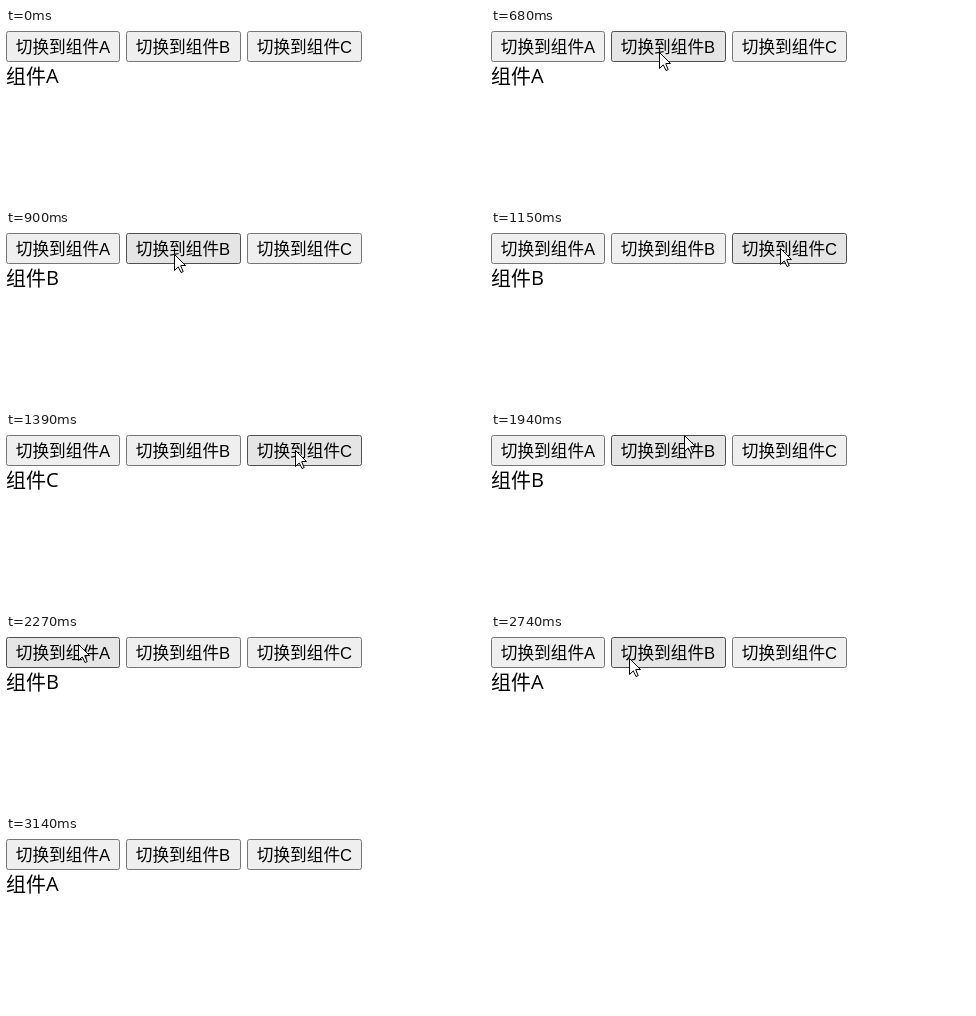
Recreate the animation shown at these times as an HTML page. Size 479x174 px, loop 3610 ms.

```html
<!DOCTYPE html>
<html lang="zh">
<head>
<meta charset="utf-8">
<title>切换组件</title>
<style>
  html, body { margin: 0; width: 100%; height: 100%; overflow: hidden; background: #fff; }
  svg { display: block; }
  .btn rect { fill: #efefef; stroke: #767676; }
  .btn.hover rect { fill: #e5e5e5; stroke: #4f4f4f; }
  .btn.down rect { fill: #f5f5f5; stroke: #8d8d8d; }
  .btn text { font: 300 16.667px "Liberation Sans", Arial, "Noto Sans CJK SC", "Noto Sans CJK", sans-serif; }
  .cjk { font: 300 20px "Noto Sans CJK SC", "Noto Sans CJK", sans-serif; }
  .latin { font: 20px "Open Sans", "Noto Sans", sans-serif; }
</style>
</head>
<body>
<svg id="stage" width="479" height="174" viewBox="0 0 479 174">
  <g id="buttons"></g>
  <text class="cjk" x="0" y="56">组件</text>
  <text class="latin" id="letter" x="40" y="55">A</text>
  <path id="cursor" d="M.5 .5V16.5L4.3 12.9L7 18.5L9.2 17.6L6.8 12V11.5H11.5Z"
        fill="#fff" stroke="#000" stroke-width="1" stroke-linejoin="round"/>
</svg>
<script>
const LOOP = 3610;
const NS = "http://www.w3.org/2000/svg";
const $ = id => document.getElementById(id);

function add(parent, tag, attrs, text) {
  const el = document.createElementNS(NS, tag);
  for (const k in attrs) el.setAttribute(k, attrs[k]);
  if (text) el.textContent = text;
  return parent.appendChild(el);
}

const buttons = [["A", 0, 114], ["B", 120, 115], ["C", 241, 115]].map(([name, x, w]) => {
  const g = add($("buttons"), "g", { class: "btn" });
  add(g, "rect", { x: x + .5, y: 3.5, width: w - 1, height: 30, rx: 2 });
  add(g, "text", { x: x + 9.8, y: 25 }, "切换到组件" + name);
  return { g, x, w };
});

// The screen refreshes in runs of seven steps.
const ticks = [0];
for (const [a, b] of [[130, 600], [680, 1150], [1310, 1790], [1880, 2350], [2590, 3060]])
  for (let i = 0; i < 7; i++) ticks.push(Math.floor((a + (b - a) * i / 6) / 10) * 10);
ticks.push(2430, 3140);
ticks.sort((a, b) => a - b);

const linear = p => p;
const easeIn = p => p * p;
const easeOut = p => 1 - (1 - p) ** 2;
const smooth = p => p * p * (3 - 2 * p);

// time, x, y, easing towards the point
const path = [
  [130, 293, 143, linear],
  [680, 168, 24, easeOut],
  [830, 168, 24, linear],
  [1150, 289, 18, smooth],
  [1390, 289, 18, linear],
  [1710, 197, 11, smooth],
  [1790, 194, 1, linear],
  [1950, 192, 4, linear],
  [2270, 72, 10, smooth],
  [2350, 70, 1, linear],
  [2430, 70, 5, linear],
  [2590, 72, 7, linear],
  [2740, 138, 24, easeIn],
  [3060, 354, 132, linear]
];
const presses = [[750, 830], [1310, 1390], [1790, 1880], [2350, 2430]];
const letters = [[0, "A"], [830, "B"], [1390, "C"], [1880, "B"], [2430, "A"]];

const lastBefore = (list, t, key) => list.filter(v => key(v) <= t).pop();

function pointer(t) {
  if (t < 130 || t >= 3140) return null;
  const i = path.findIndex(k => k[0] >= t);
  if (i === 0) return path[0].slice(1, 3);
  const [t0, x0, y0] = path[i - 1], [t1, x1, y1, ease] = path[i];
  const p = ease((t - t0) / (t1 - t0));
  return [Math.round(x0 + (x1 - x0) * p), Math.round(y0 + (y1 - y0) * p)];
}

function draw(now) {
  const t = lastBefore(ticks, now % LOOP, v => v);
  const pos = pointer(t);
  const down = presses.some(([a, b]) => t >= a && t < b);
  for (const { g, x, w } of buttons) {
    const over = pos && pos[0] >= x && pos[0] < x + w && pos[1] < 34;
    g.setAttribute("class", "btn" + (over ? down ? " down" : " hover" : ""));
  }
  $("letter").textContent = lastBefore(letters, t, v => v[0])[1];
  $("cursor").style.display = pos ? "" : "none";
  if (pos) $("cursor").setAttribute("transform", `translate(${pos})`);
}

const start = performance.now();
function loop() {
  draw(performance.now() - start);
  requestAnimationFrame(loop);
}
loop();
</script>
</body>
</html>
```
